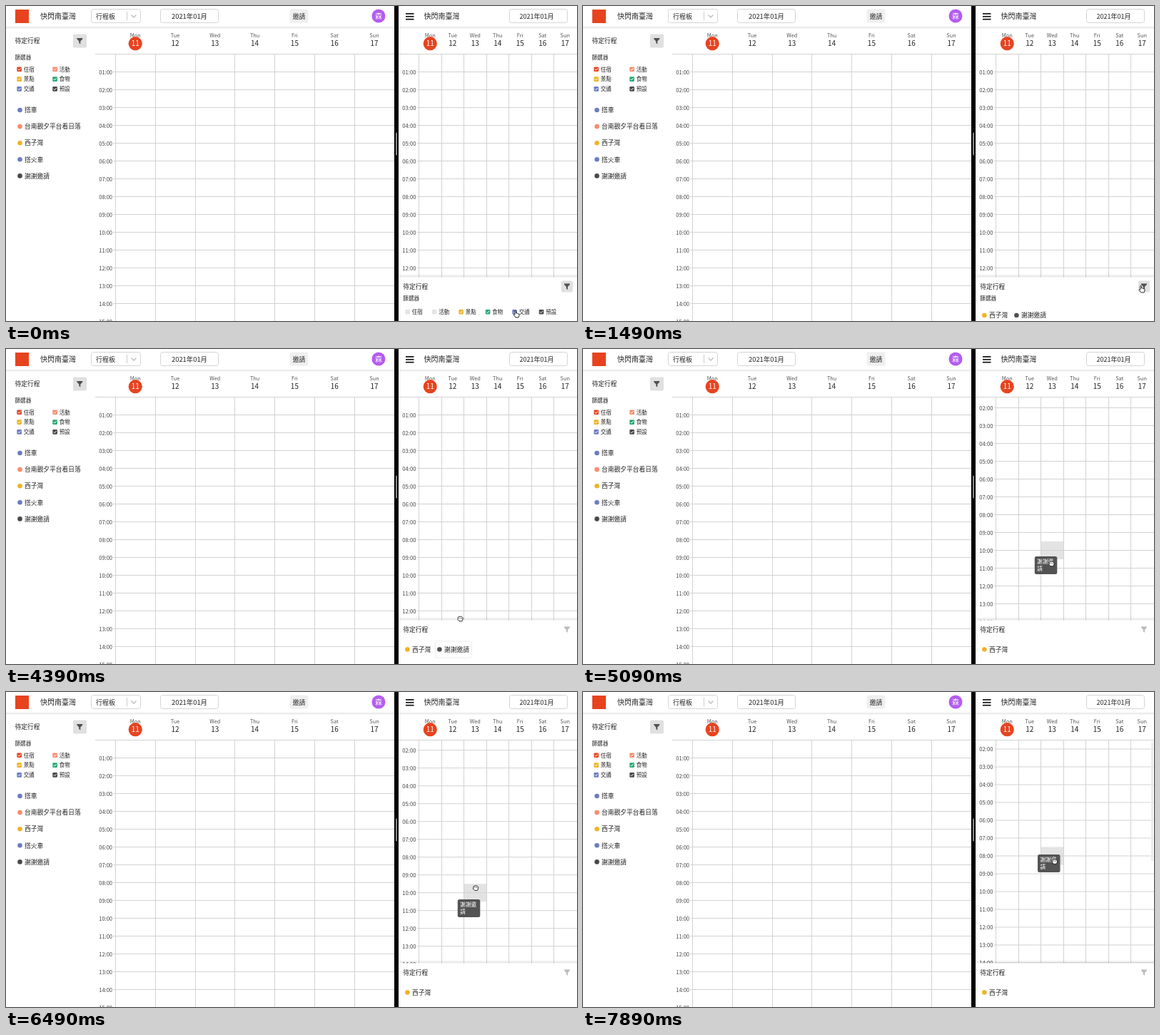
Recreate the animation shown at these times as an HTML page. Size 800 by 442 pixels, loop 7990 ms.

```html
<!DOCTYPE html>
<html lang="zh-Hant">
<head>
<meta charset="utf-8">
<title>行程板</title>
<style>
html, body { margin: 0; width: 100%; height: 100%; overflow: hidden; background: #fff; }
svg { display: block; width: 800px; height: 442px; }
text { font-family: "Noto Sans CJK TC", "Noto Sans CJK", "Noto Sans CJK JP", "Noto Sans", sans-serif; }
</style>
</head>
<body>
<svg id="stage" viewBox="0 0 800 442"></svg>
<script>
const LOOP = 7990;
const INK = '#222', LINE = '#d2d2d2', RED = '#e8431f', GRAY = '#505050';
const FILTERS = [
  ['住宿', RED], ['活動', '#fa8b6c'], ['景點', '#efb325'],
  ['食物', '#2aa975'], ['交通', '#6b7cc3'], ['預設', '#484848']
];
const colorOf = Object.fromEntries(FILTERS);
const DAYS = ['Mon', 'Tue', 'Wed', 'Thu', 'Fri', 'Sat', 'Sun'];
const stage = document.getElementById('stage');

function add(parent, tag, attrs = {}, content) {
  const el = document.createElementNS('http://www.w3.org/2000/svg', tag);
  for (const key in attrs) el.setAttribute(key, attrs[key]);
  if (content) el.textContent = content;
  parent.appendChild(el);
  return el;
}
const group = (parent, attrs) => add(parent, 'g', attrs);
const box = (parent, x, y, width, height, fill, extra) =>
  add(parent, 'rect', { x, y, width, height, fill, ...extra });
const path = (parent, d, extra) => add(parent, 'path', { d, fill: 'none', ...extra });
const dot = (parent, cx, cy, r, fill) => add(parent, 'circle', { cx, cy, r, fill });

// y is the vertical middle of the glyphs
const label = (parent, str, x, y, size, extra) =>
  add(parent, 'text', { x, y: y + size * 0.37, 'font-size': size, fill: INK, 'font-weight': 500, ...extra }, str);
const centered = (parent, str, x, y, size, extra) =>
  label(parent, str, x, y, size, { 'text-anchor': 'middle', ...extra });

const outlined = (parent, x, width) =>
  box(parent, x + 0.5, 4.5, width - 1, 19, '#fff', { rx: 3, stroke: '#d4d4d4' });
const funnel = (parent, x, y, fill) =>
  path(parent, `M${x - 4} ${y - 4}h8v1.2l-3 3.2v4l-2-1.3v-2.7l-3-3.2z`, { fill });

function checkbox(parent, x, y, name) {
  const g = group(parent);
  const square = box(g, x, y - 3.3, 6.6, 6.6, colorOf[name], { rx: 1 });
  const tick = path(g, `M${x + 1.4} ${y}l1.4 1.4l2.5-2.8`, { stroke: '#fff', 'stroke-width': 1 });
  label(g, name, x + 9.5, y, 7.5);
  return checked => {
    square.setAttribute('fill', checked ? colorOf[name] : '#e4e4e4');
    show(tick, checked);
  };
}

function listItem(parent, x, y, name, color) {
  dot(parent, x, y, 3.3, color);
  label(parent, name, x + 6.5, y, 8.75);
}

// hour rows and day columns; lines run from `left` to `right`
function hourGrid(parent, left, right, step, size) {
  for (let h = 1; h < 18; h++) {
    const y = 67.5 + 25 * h;
    path(parent, `M${left - 3} ${y}H${right}`, { stroke: LINE });
    label(parent, String(h).padStart(2, '0') + ':00', left - 4.5, y + 0.5, size,
      { 'text-anchor': 'end', fill: '#444', 'font-weight': 400 });
  }
}
const dayLines = (parent, left, step) => DAYS.forEach((_, i) =>
  path(parent, `M${Math.round(left + i * step) + 0.5} 68V442`, { stroke: LINE }));

function dayHeader(parent, left, step) {
  const numbers = [];
  DAYS.forEach((day, i) => {
    const x = left + (i + 0.5) * step;
    centered(parent, day, x, 41, 7.4, { fill: '#555', 'font-weight': 400 });
    if (!i) dot(parent, x, 52.7, 9.6, RED);
    numbers.push(centered(parent, String(11 + i), x, 52.5, 10, { fill: i ? INK : '#fff' }));
  });
  return numbers;
}

function topEdge(x, width) {
  box(stage, x, 29.5, width, 1, '#d8d8d8');
  box(stage, x, 30.5, width, 1, '#efefef');
}

// desktop pane
hourGrid(stage, 153.5, 544, 55.8, 7.5);
dayLines(stage, 153, 55.8);
path(stage, 'M125 67.5H544', { stroke: LINE });
const deskNumbers = dayHeader(stage, 153.3, 55.8);
topEdge(0, 544);
box(stage, 13, 5, 19, 19, RED);
label(stage, '快閃南臺灣', 48, 14.3, 10);
outlined(stage, 119, 70);
label(stage, '行程板', 126, 14.3, 9);
path(stage, 'M169.5 8V20', { stroke: '#ccc' });
path(stage, 'M175.5 12.5l3.5 3.5l3.5-3.5', { stroke: '#bbb', 'stroke-width': 1.3 });
outlined(stage, 216, 82);
centered(stage, '2021年01月', 257, 14.3, 9.4);
box(stage, 397.5, 4.5, 26, 19, '#efefef', { rx: 3 });
centered(stage, '邀請', 410.5, 14.3, 8.8);
dot(stage, 522, 14, 9.5, '#b45cf0');
centered(stage, '森', 522, 14.2, 10, { fill: '#fff' });

label(stage, '待定行程', 12.5, 49, 8.75);
box(stage, 94, 39.5, 19, 19, '#e0e0e0', { rx: 2 });
funnel(stage, 103.3, 49, GRAY);
label(stage, '篩選器', 12.5, 72, 7.6);
FILTERS.forEach(([name], i) => checkbox(stage, 15.3 + 50 * (i % 2), 88.8 + 13.8 * (i >> 1), name));
[['搭車', '交通'], ['台南觀夕平台看日落', '活動'], ['西子灣', '景點'], ['搭火車', '交通'], ['謝謝邀請', '預設']]
  .forEach(([name, kind], i) => listItem(stage, 19.5, 146 + 23.1 * i, name, colorOf[kind]));

// divider
box(stage, 544, 0, 6, 442, '#000');
box(stage, 546, 177.5, 2, 32, '#8a8a8a', { rx: 1 });

// mobile calendar
const clip = add(add(stage, 'defs'), 'clipPath', { id: 'view' });
box(clip, 550, 68, 250, 374, '#000');
const view = group(stage, { 'clip-path': 'url(#view)' });
const scroller = group(view);
const slot = box(scroller, 642, 0, 31, 25, '#e3e3e3');
hourGrid(scroller, 579, 800, 31.5, 7.7);
dayLines(view, 578.3, 31.5);
const scrollbar = box(view, 796, 70, 3, 167, '#ececec', { rx: 1.5 });
path(stage, 'M550 67.5H800', { stroke: LINE });
dayHeader(stage, 578.5, 31.5);
topEdge(550, 250);
for (let i = 0; i < 3; i++) box(stage, 560, 10 + 3.9 * i, 11.5, 1.7, '#111');
label(stage, '快閃南臺灣', 585.5, 14.3, 10);
outlined(stage, 705, 82);
centered(stage, '2021年01月', 743.6, 14.3, 9);

// mobile drawer
[0.03, 0.05, 0.08, 0.12].forEach((a, i) => box(stage, 550, 376.5 + i, 250, 1, `rgba(0,0,0,${a})`));
box(stage, 550, 380.5, 250, 62, '#fff');
label(stage, '待定行程', 556.3, 394, 8.75);
const filterButton = box(stage, 778, 385.5, 16, 16, '#e0e0e0', { rx: 2 });
const filterIcon = funnel(stage, 786, 393.5, GRAY);
const filterLabel = label(stage, '篩選器', 556.3, 410, 7.6);
const checkRow = group(stage);
const setChecked = FILTERS.map(([name], i) => checkbox(checkRow, 559.3 + 37.5 * i, 429.3, name));
const items = group(stage);
const hoverBox = (x, width) =>
  box(items, x, -11.5, width, 23, '#fff', { rx: 2, stroke: '#ececec' });
const bayHover = hoverBox(555.5, 43);
listItem(items, 562.4, 0, '西子灣', colorOf['景點']);
const thanks = group(items);
const thanksHover = hoverBox(601.5, 51);
thanks.appendChild(thanksHover);
listItem(thanks, 607.4, 0, '謝謝邀請', '#505050');

// dragged card, then pointer shapes centred on the origin
const card = group(stage);
box(card, 0, 0, 31.5, 25, '#4d4d4d', { rx: 2.5, opacity: 0.96 });
['謝謝邀', '請'].forEach((line, i) => label(card, line, 3.5, 7.3 + 10.3 * i, 7.6, { fill: '#fff' }));

const inkStyle = { fill: '#fff', stroke: '#111', 'stroke-width': 0.9, 'stroke-linejoin': 'round' };
const cursor = group(stage);
const hand = path(cursor,
  'M-2.2-4.2Q-1.4-5.2-.6-4.2V-1Q.4-1.6 1-.7Q2-1.1 2.5-.2Q3.8-.4 4 .8V2.4L3 5H-1L-4 1.2Q-3.8 0-2.2 1z', inkStyle);
const fist = group(cursor);
path(fist, 'M-3.2-2Q-2.5-3.5-1.2-2.9Q0-3.8 1-2.9Q2.4-3.3 3-2Q4-1.2 3.4.8L2.4 3.3H-1.6L-3.7.8Q-3.9-.4-2.9-.4z', inkStyle);
path(fist, 'M-1.2-1.5V-.2M.5-1.6V-.2M2-1.3V-.2', { stroke: '#111', 'stroke-width': 0.6 });

const show = (el, on) => el.setAttribute('visibility', on ? 'inherit' : 'hidden');
const move = (el, x, y) => el.setAttribute('transform', `translate(${x} ${y})`);

// linear track of [time, ...values]
function track(keys, t) {
  const next = keys.findIndex(k => k[0] > t);
  if (next < 0) return keys[keys.length - 1].slice(1);
  const a = keys[next - 1], b = keys[next];
  const p = (t - a[0]) / (b[0] - a[0]);
  return a.slice(1).map((v, i) => v + (b[i + 1] - v) * p);
}
const POINTER = [
  [0, 715, 432], [290, 715, 432], [690, 783, 397], [1790, 783, 397], [2390, 581, 423.5],
  [2790, 581, 423.5], [3190, 625, 422], [4090, 625, 422], [4390, 636.5, 378.5],
  [4790, 656.5, 301.5], [5790, 656.5, 301.5], [7090, 659.5, 252.5], [7890, 661, 238]
];
const ITEMS_Y = [[0, 453], [1390, 453], [1490, 434], [1590, 424.5], [1690, 421.5]];
const SCROLL = [[0, 0], [4590, 0], [4690, 35], [5790, 35], [7090, 36.5], [7890, 37.5]];

function draw(t) {
  const [x, y] = track(POINTER, t);
  const scroll = track(SCROLL, t)[0];
  const dragging = t >= 4690, moved = t >= 7390, open = t < 1590;

  move(scroller, 0, -scroll);
  show(slot, dragging);
  slot.setAttribute('y', 67.5 + 25 * (moved ? 7.5 : 9.5));
  show(scrollbar, moved);
  deskNumbers.forEach(n => show(n, t < 5690 || t >= 6090));

  show(filterButton, open);
  filterIcon.setAttribute('fill', open ? GRAY : '#bbb');
  show(filterLabel, open);
  show(checkRow, t < 1390);
  setChecked.forEach((set, i) => set(i > 1 && (i !== 4 || t < 290)));

  move(items, 0, track(ITEMS_Y, t)[0]);
  show(bayHover, t >= 2290 && t < 2990);
  show(thanks, !dragging);
  show(thanksHover, t >= 2990 && !dragging);

  show(card, dragging);
  move(card, moved ? x - 24 : 632.8, moved ? y - 10 : 291);
  move(cursor, x, y);
  show(hand, t < 4190);
  show(fist, t >= 4190);
}

const start = performance.now();
function tick() {
  const t = (performance.now() - start) % LOOP;
  draw(t < 90 ? 0 : 90 + Math.floor((t - 90) / 100) * 100);
  requestAnimationFrame(tick);
}
tick();
</script>
</body>
</html>
```
